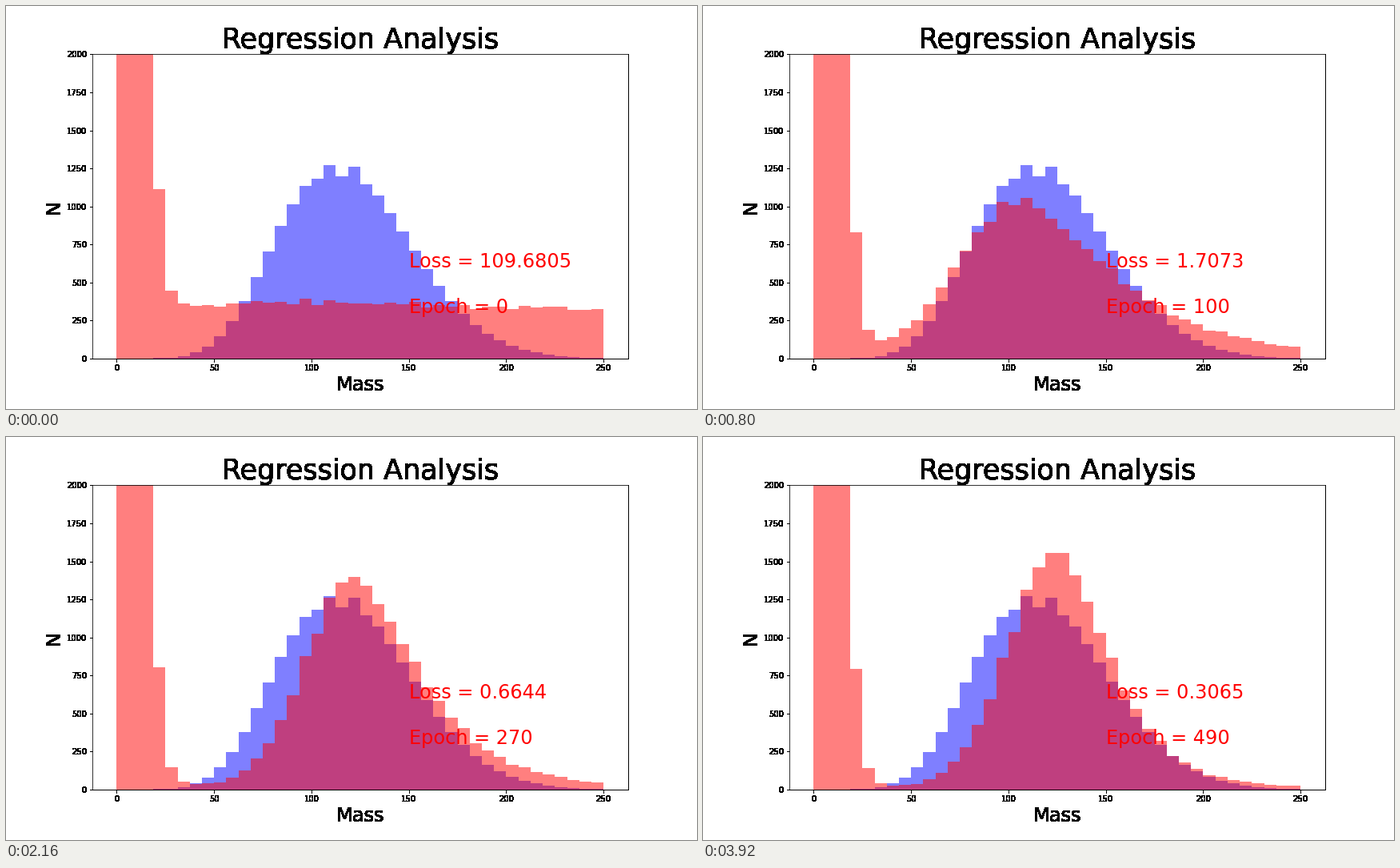
These frames come from a looping animation (864x504 px, 4 s). A matplotlib script:

```python
import numpy as np
import matplotlib.pyplot as plt
from matplotlib.animation import FuncAnimation

FRAMES, INTERVAL, EPOCH_STEP = 50, 80, 10
BINS, BIN_WIDTH = 40, 6.25

# epoch, loss, then the predicted peak: height, centre bin, left and right spread, floor
stages = np.array([
    (0, 109.6805, 50, 17, 14, 14, 322),
    (40, 3.3181, 950, 5, 8, 13.6, 40),
    (70, 2.0856, 920, 15, 8.3, 10.7, 35),
    (140, 1.4049, 1100, 18.3, 6.1, 9.5, 35),
    (270, 0.6644, 1385, 19.1, 5.6, 7.3, 30),
    (360, 0.4139, 1490, 19.4, 5.7, 6.5, 25),
    (490, 0.3065, 1570, 19.7, 5.75, 5.8, 22),
])

k = np.arange(BINS)
jitter = 0.5 * np.random.default_rng(4).standard_normal(BINS)
spike = 770 * np.exp(-1.85 * (k - 3))


def peak(height, centre, left, right, left_power, right_power):
    """Lopsided bell over the bins."""
    d = k - centre
    spread = np.where(d < 0, left, right)
    power = np.where(d < 0, left_power, right_power)
    return height * np.exp(-(np.abs(d) / spread) ** power)


def progress(epoch):
    """Training slows down, so stages are spaced on a log scale."""
    return np.log(epoch + 10)


def stage_value(epoch, column):
    return np.interp(progress(epoch), progress(stages[:, 0]), column)


def loss_at(epoch):
    return np.exp(stage_value(epoch, np.log(stages[:, 1])))


def prediction(epoch):
    height, centre, left, right, floor = (
        stage_value(epoch, column) for column in stages[:, 2:].T)
    bell = floor + peak(height, centre, left, right, 2.05, 1.45)
    return spike + bell + jitter * np.sqrt(bell)


def truth():
    ripple = 45 * (-1.0) ** k * np.exp(-((k - 18) / 2) ** 2)
    return peak(1245, 18.2, 7.67, 7.98, 2.65, 1.8) - ripple


def solid_black(img, dpi):
    """Turn every touched pixel fully black, for hard-edged lettering."""
    out = np.zeros_like(img)
    out[..., 3] = img[..., 3] > 0
    return out, 0, 0


plt.rcParams.update({"font.family": "DejaVu Sans", "font.size": 10})
fig, ax = plt.subplots(figsize=(12, 7), dpi=72, facecolor="white")
fig.subplots_adjust(left=0.125, right=0.9, bottom=0.125, top=0.88)
ax.set_xlim(-12.5, 262.5)
ax.set_ylim(0, 2000)
ax.set_xticks(range(0, 251, 50))
ax.set_yticks(range(0, 2001, 250))
title = ax.set_title("Regression Analysis", fontsize=35)
ax.set_xlabel("Mass", fontsize=24)
ax.set_ylabel("N", fontsize=24)
for part in (title, ax.xaxis, ax.yaxis, ax.spines["bottom"], ax.spines["right"]):
    part.set_agg_filter(solid_black)


def histogram(counts, color):
    return ax.bar(k * BIN_WIDTH, counts, BIN_WIDTH, align="edge", color=color, alpha=0.5)


histogram(truth(), "blue")
bars = histogram(prediction(0), "red")
loss_text = ax.text(150, 600, "", fontsize=24, color="red")
epoch_text = ax.text(150, 300, "", fontsize=24, color="red")


def update(frame):
    epoch = frame * EPOCH_STEP
    for bar, count in zip(bars, prediction(epoch)):
        bar.set_height(count)
    loss_text.set_text(f"Loss = {loss_at(epoch):.4f}")
    epoch_text.set_text(f"Epoch = {epoch}")
    return [*bars, loss_text, epoch_text]


anim = FuncAnimation(fig, update, frames=FRAMES, interval=INTERVAL,
                     repeat=True, repeat_delay=0, blit=False)
plt.show()
```
